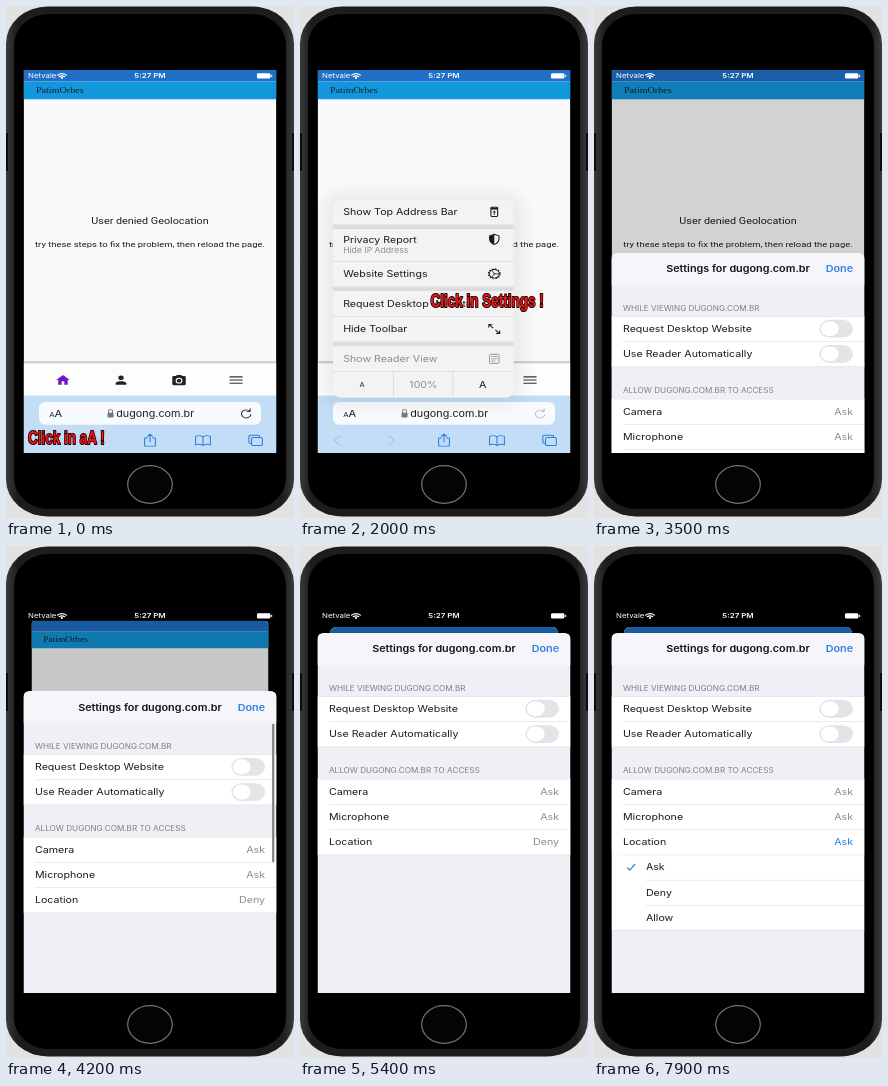
An HTML page for the animation above (8000 ms loop, 288 by 512 pixels).

```html
<!DOCTYPE html>
<html lang="en">
<head>
<meta charset="utf-8">
<title>Location permission steps</title>
<style>
html, body { margin: 0; width: 100%; height: 100%; overflow: hidden; background: #e2e2e2; }
svg { display: block; width: 288px; height: 512px; }
text { font-family: Inter, sans-serif; white-space: pre; }
.page { font-family: Roboto, sans-serif; }
.brand { font-family: "Liberation Serif", serif; }
.tip { font: bold 18px "Liberation Sans", sans-serif; fill: #f01414; stroke: #160000; stroke-width: 2; paint-order: stroke; stroke-linejoin: round; }
</style>
</head>
<body>
<svg id="stage" viewBox="0 0 288 512" xmlns="http://www.w3.org/2000/svg"></svg>
<script>
const LOOP = 8000;
const W = 375, H = 667;
const BLUE = '#2b7fe6', INK = '#1b1b1d', GREY = '#8b8b90';

const text = (x, y, s, size = 15.8, fill = INK, more = '') =>
  `<text x="${x}" y="${y}" font-size="${size}" fill="${fill}" ${more}>${s}</text>`;
const rect = (x, y, w, h, fill, more = '') =>
  `<rect x="${x}" y="${y}" width="${w}" height="${h}" fill="${fill}" ${more}/>`;
const line = (d, color, w = 1.6, more = '') =>
  `<path d="${d}" fill="none" stroke="${color}" stroke-width="${w}" stroke-linecap="round" stroke-linejoin="round" ${more}/>`;
const at = (x, y, body, more = '') => `<g transform="translate(${x} ${y})" ${more}>${body}</g>`;
const MID = 'text-anchor="middle"', END = 'text-anchor="end"', BOLD = 'font-weight="600"';

function statusBar() {
  return text(6.7, 14.6, 'Netvale', 11.6, '#fff') +
    at(57, 14.5,
      line('M-6.5 -5.5Q0 -11 6.5 -5.5M-4 -2.8Q0 -6 4 -2.8', '#fff', 2) +
      '<circle cy="-.6" r="1.7" fill="#fff"/>') +
    text(187.5, 14.6, '5:27 PM', 11.8, '#fff', MID + ' ' + BOLD) +
    rect(346, 5.5, 20, 9.5, '#fff', 'rx="2.5"') + rect(367, 8.5, 1.6, 3.6, '#fff');
}

function navIcons() {
  const home = '<path d="M-2 8v-6h4v6h5v-8h3L0 -9 -10 0h3v8z" fill="#7115c9"/>';
  const user = '<circle cy="-4" r="4" fill="#222"/><path d="M-8 8v-2c0-3 5-4 8-4s8 1 8 4v2z" fill="#222"/>';
  const camera = '<path d="M-3 -9L-5 -7H-8q-2 0-2 2V7q0 2 2 2H8q2 0 2-2V-5q0-2-2-2H5L3 -9z" fill="#222"/>' +
    '<circle cy="1" r="4.2" fill="#222" stroke="#fff" stroke-width="1.8"/>';
  const bars = line('M-9 -5.5H9M-9 0H9M-9 5.5H9', '#333', 1.9);
  return at(58.5, 540, home) + at(144.5, 540, user) + at(230.5, 540, camera) + at(315, 540, bars);
}

function toolbar() {
  const share = line('M-4 -4H-8V10H8V-4H4M0 3V-11M-4 -7L0 -11 4 -7', BLUE);
  const book = line('M0 -6Q-5 -10 -11 -7V8Q-5 5 0 9Q5 5 11 8V-7Q5 -10 0 -6V9', BLUE);
  const tabs = line('M-6 5H-8q-2 0-2-2V-7q0-2 2-2H4q2 0 2 2v2', BLUE) +
    rect(-6, -5, 16, 14, 'none', `rx="2" stroke="${BLUE}" stroke-width="1.6"`);
  const lock = rect(-4.5, -1, 9, 8, '#77787c', 'rx="1.5"') + line('M-2.8 -1V-4a2.8 3 0 0 1 5.6 0V-1', '#77787c');
  const reload = line('M5.5 -4.5A7 7 0 1 0 7 1M5.8 -9V-4H.8', 'currentColor', 1.6);
  return rect(0, 567, W, 100, '#c3ddf6') +
    rect(23, 578, 329, 40, '#f8fbfe', 'rx="10"') +
    text(38, 605, 'A', 11.5) + text(46, 605, 'A', 16.5) +
    at(129, 598, lock) + text(137.5, 605, 'dugong.com.br', 16) +
    at(330, 599, reload, 'id="reload"') +
    line('M33 637L25 645 33 653', '#a3c3e2') + line('M106 637L114 645 106 653', '#a3c3e2') +
    at(187.5, 645, share) + at(266, 645, book) + at(344, 645, tabs);
}

function page() {
  return rect(0, 0, W, H, '#fafafa') +
    rect(0, 0, W, 20, '#2070c8') + rect(0, 20, W, 31, '#1397dc') +
    text(18.5, 40, 'PatimOrbes', 15, '#17202c', 'class="brand"') +
    text(187.5, 269, 'User denied Geolocation', 16, '#1c1c1c', 'class="page" ' + MID) +
    text(187.5, 308, 'try these steps to fix the problem, then reload the page.', 14, '#1c1c1c', 'class="page" ' + MID) +
    rect(0, 507, W, 4.5, '#cfcfcf') + rect(0, 511, W, 56, '#fdfdfd') +
    navIcons() + toolbar();
}

function menu() {
  const x = 23, w = 268;
  const gap = y => rect(x, y, w, 8, '#dcdcde');
  const rule = y => rect(x, y, w, 1, '#d3d3d5');
  const row = (y, s, fill = INK) => text(38, y + 5.5, s, 15.8, fill);
  const bar = rect(-5, -8, 10, 16, 'none', `rx="1.5" stroke="${INK}" stroke-width="1.6"`) +
    rect(-5, -7, 10, 3, INK) + line('M0 5V-1M-2 1L0 -1 2 1', INK, 1.3);
  const shield = '<path d="M0 -9L7 -6V0Q6 6 0 9Q-6 6 -7 0V-6Z" fill="none" stroke="#1b1b1d" stroke-width="1.6"/>' +
    '<path d="M0 -9V9Q-6 6 -7 0V-6Z" fill="#1b1b1d"/>';
  const gear = `<circle r="7.5" fill="none" stroke="${INK}" stroke-width="1.5"/>` +
    `<circle r="8.8" fill="none" stroke="${INK}" stroke-width="1.6" stroke-dasharray="2.3 2.3"/>` +
    line('M0 0H7M0 0L-3.6 -6M0 0L-3.6 6', INK, 1.3);
  const arrows = line('M-2 -2L-8 -8M-8 -3V-8H-3M2 2L8 8M8 3V8H3', INK);
  const reader = rect(-7, -8, 14, 16, 'none', `rx="2" stroke="${GREY}" stroke-width="1.4"`) +
    line('M-4 -4H4M-4 0H4M-4 4H1', GREY, 1.2);
  return rect(x - 12, 215, w + 24, 366, '#000', 'rx="24" opacity=".08" filter="url(#soft)"') +
    `<g clip-path="url(#menuClip)">` + rect(x, 225, w, 346, '#f3f3f4') +
    row(247, 'Show Top Address Bar') + gap(269) +
    row(295, 'Privacy Report') + text(38, 319.5, 'Hide IP Address', 12.8, GREY) + rule(333) +
    row(355, 'Website Settings') + gap(377) +
    row(407, 'Request Desktop Website') + rule(429) +
    row(451, 'Hide Toolbar') + gap(473) +
    row(503, 'Show Reader View', GREY) + rule(525) +
    rect(112, 525, 1, 46, '#d3d3d5') + rect(200, 525, 1, 46, '#d3d3d5') +
    text(66, 552, 'A', 11, INK, MID) + text(157, 553, '100%', 15.8, GREY, MID) + text(245, 553, 'A', 16, INK, MID) +
    at(262, 247, bar) + at(262, 295, shield) + at(262, 355, gear) + at(262, 451, arrows) + at(262, 503, reader) +
    '</g>';
}

function sheet() {
  const rule = (y, x = 17) => rect(x, y, W - x, 1, '#dcdce0');
  const edge = y => rect(0, y, W, 1, '#dadade');
  const label = (y, s, x = 17) => text(x, y + 5.5, s);
  const value = (y, s, fill = GREY, more = '') => text(358, y + 5.5, s, 15.8, fill, END + ' ' + more);
  const toggle = y => rect(308, y - 15.5, 50, 31, '#e4e4e7', 'rx="15.5"') +
    `<circle cx="323.5" cy="${y}" r="14" fill="#fff" stroke="#d0d0d4" stroke-width=".8"/>`;
  const head = (y, s) => text(17, y + 4.5, s, 12.1, '#7d7d83');
  return '<path d="M0 700V11Q0 0 11 0H364Q375 0 375 11V700Z" fill="#f0eff6"/>' +
    '<path d="M0 56V11Q0 0 11 0H364Q375 0 375 11V56Z" fill="#f6f6fa"/>' +
    text(187.5, 34, 'Settings for dugong.com.br', 16, '#111', MID + ' ' + BOLD) +
    text(358, 34, 'Done', 16, BLUE, END + ' ' + BOLD) +
    head(97, 'WHILE VIEWING DUGONG.COM.BR') +
    rect(0, 110, W, 88, '#fff') + edge(110) + rule(154) + edge(198) +
    label(132, 'Request Desktop Website') + toggle(132) +
    label(176, 'Use Reader Automatically') + toggle(176) +
    head(240, 'ALLOW DUGONG.COM.BR TO ACCESS') +
    rect(0, 254, W, 132, '#fff') + edge(254) + rule(298) + rule(342) +
    label(276, 'Camera') + value(276, 'Ask') +
    label(320, 'Microphone') + value(320, 'Ask') +
    label(364, 'Location') + value(364, 'Deny', GREY, 'id="choice"') +
    `<g clip-path="url(#openClip)">` + rect(0, 386, W, 132, '#fff') +
    '<g id="options">' + rule(386) + rule(430, 51) + rule(474, 51) +
    label(408, 'Ask', 51) + label(452, 'Deny', 51) + label(496, 'Allow', 51) +
    at(29, 408, line('M-5.5 1L-2 5 5.5 -5', BLUE, 1.8), 'id="tick"') + '</g></g>' +
    `<g id="bottom">${edge(386)}</g>` +
    rect(368.5, 57, 3.2, 241, '#7e7e84', 'rx="1.6" id="scroll"');
}

const tip = (id, x, y, s) =>
  `<g id="${id}" transform="translate(${x} ${y}) scale(.75 1)"><text class="tip">${s}</text></g>`;

document.getElementById('stage').innerHTML = `
<defs>
  <linearGradient id="rim"><stop offset="0" stop-color="#3a3a3a"/><stop offset=".04" stop-color="#1d1d1d"/>
    <stop offset=".96" stop-color="#1d1d1d"/><stop offset="1" stop-color="#3a3a3a"/></linearGradient>
  <filter id="soft" x="-20%" y="-20%" width="140%" height="140%"><feGaussianBlur stdDeviation="16"/></filter>
  <clipPath id="screenClip">${rect(0, 0, W, H, '#000')}</clipPath>
  <clipPath id="menuClip">${rect(23, 225, 268, 346, '#000', 'rx="12"')}</clipPath>
  <clipPath id="openClip">${rect(0, 386, W, 0, '#000', 'id="openBox"')}</clipPath>
  <clipPath id="cardClip">${rect(0, 0, W, H + 60, '#000', 'id="cardBox"')}</clipPath>
</defs>
${rect(0, 0, 288, 512, '#e2e2e2')}
${rect(0, .5, 288, 510, 'url(#rim)', 'rx="42" ry="37"')}
${rect(0, 127, 2, 38, '#0c0c0c')}${rect(286, 127, 2, 38, '#0c0c0c')}
${rect(8, 8, 272, 495, '#000', 'rx="35" ry="31"')}
<ellipse cx="144" cy="478.5" rx="22.3" ry="18.8" fill="#040404" stroke="#727272" stroke-width="1.2"/>
<g transform="translate(17.5 64) scale(.6747 .5742)"><g clip-path="url(#screenClip)">
  ${rect(0, 0, W, H, '#000')}
  <g id="card"><g clip-path="url(#cardClip)">${page()}<g id="menu">${menu()}</g>
    ${rect(0, 0, W, H, '#000', 'id="dim"')}</g></g>
  ${statusBar()}
  <g id="sheet">${sheet()}</g>
</g></g>
${tip('tipOne', 22, 438, 'Click in aA !')}
${tip('tipTwo', 130.5, 301, 'Click in Settings !')}`;

const el = {};
document.querySelectorAll('#stage [id]').forEach(n => el[n.id] = n);

const clamp = v => Math.max(0, Math.min(1, v));
const ramp = (t, a, b) => clamp((t - a) / (b - a));
const ease = p => p * p * (3 - 2 * p);
const show = (n, on) => n.setAttribute('visibility', on ? 'visible' : 'hidden');
const set = (n, k, v) => n.setAttribute(k, v);

// time, sheet top, speed
const RISE = [[2900, 667, 0], [3100, 625, -.5], [3500, 319, -.5], [4500, 110, -.12], [5400, 40, 0]];

function sheetTop(t) {
  if (t <= RISE[0][0]) return H;
  for (let i = 1; i < RISE.length; i++) {
    const [a, y0, v0] = RISE[i - 1], [b, y1, v1] = RISE[i];
    if (t > b) continue;
    const d = b - a, u = (t - a) / d, s = ease(u);
    return y0 + (y1 - y0) * s + d * u * (1 - u) * (v0 * (1 - u) - v1 * u);
  }
  return 40;
}

function draw(t) {
  show(el.tipOne, t < 1000);
  show(el.tipTwo, t >= 1400 && t < 2600);

  const open = ease(ramp(t, 1000, 1400)) * (1 - ease(ramp(t, 2600, 2850)));
  const k = .2 + .8 * open;
  set(el.menu, 'opacity', open);
  set(el.menu, 'transform', `translate(${50 * (1 - k)} ${575 * (1 - k)}) scale(${k})`);
  set(el.reload, 'color', t < 1000 ? '#2a2a2c' : '#bcc1c7');

  const top = sheetTop(t);
  set(el.sheet, 'transform', `translate(0 ${top})`);
  const back = clamp((319 - top) / 279), size = 1 - .1 * back;
  set(el.card, 'transform', `translate(${W / 2 * (1 - size)} ${29.6 * back}) scale(${size})`);
  set(el.cardBox, 'rx', 10 * back);
  set(el.dim, 'opacity', .2 * Math.min(1, 1.45 * (H - top) / 627));
  set(el.scroll, 'opacity', ramp(t, 3900, 4100) * (1 - ramp(t, 4900, 5200)));

  const grow = ease(ramp(t, 6500, 6900)), picked = t >= 7700;
  set(el.openBox, 'height', 132 * grow);
  set(el.options, 'opacity', grow);
  set(el.bottom, 'transform', `translate(0 ${132 * grow})`);
  set(el.tick, 'transform', `translate(29 ${picked ? 408 : 452})`);
  el.choice.textContent = picked ? 'Ask' : 'Deny';
  set(el.choice, 'fill', grow > 0 ? BLUE : GREY);
}

function tick() {
  draw(performance.now() % LOOP);
  requestAnimationFrame(tick);
}
tick();
</script>
</body>
</html>
```
